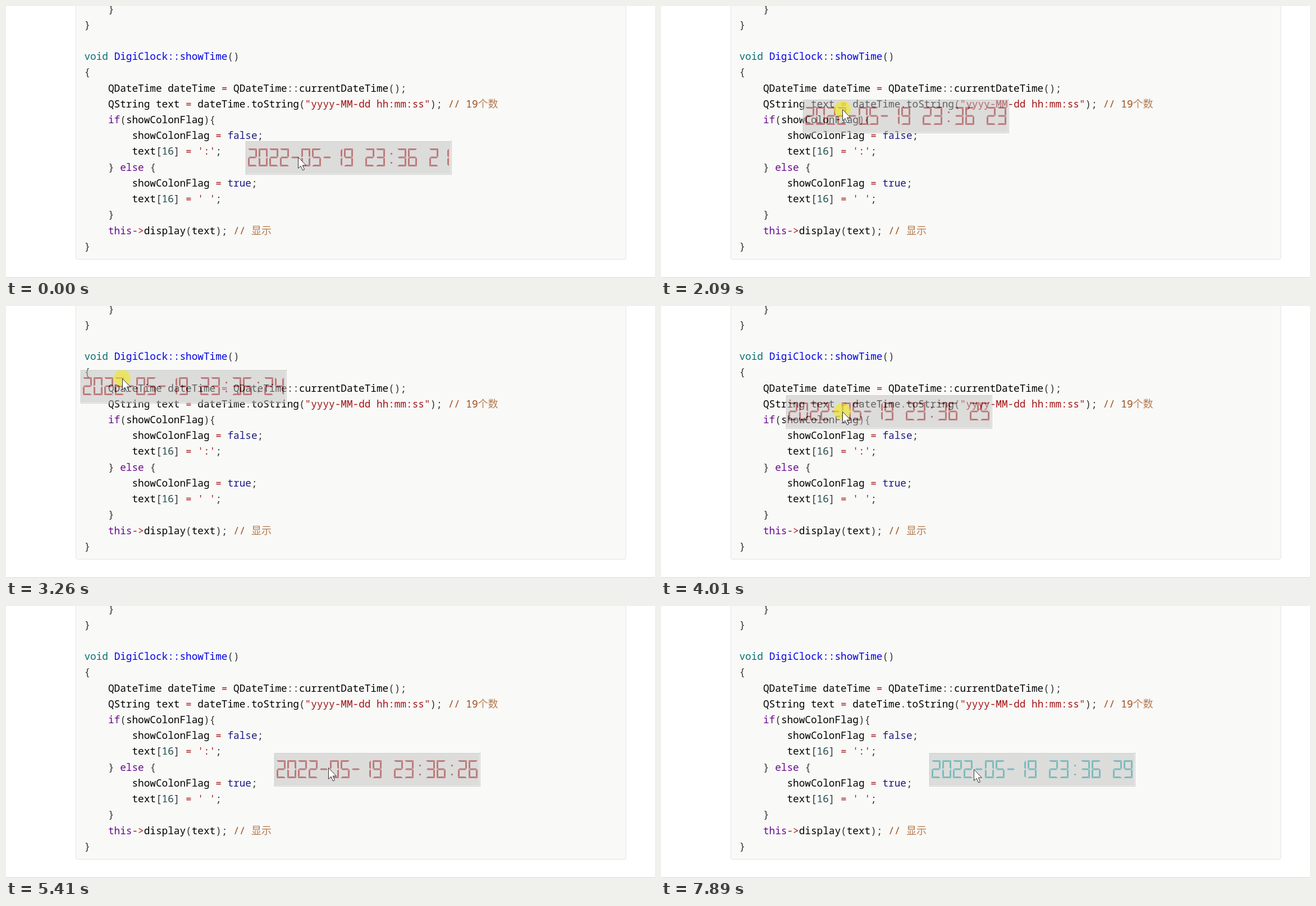
These frames come from a looping animation (1156x485 px, 8000 ms). An HTML page:

```html
<!DOCTYPE html>
<html lang="zh">
<head>
<meta charset="utf-8">
<title>DigiClock</title>
<style>
html, body { margin: 0; width: 100%; height: 100%; overflow: hidden; background: #fff; }
svg { display: block; width: 1156px; height: 485px; }
text { font: 17.72px "Noto Sans Mono", "DejaVu Sans Mono", monospace; white-space: pre; fill: #000; }
.p { fill: #333; }
.t { fill: #087070; }
.f { fill: #0000e6; }
.o { fill: #a61717; }
.s { fill: #a31515; }
.n { fill: #204a4a; }
.k { fill: #660a8a; }
.b { fill: #1a1a80; }
.c { fill: #9c4a18; }
.z { fill: #b57a4d; font: 300 18px "Noto Sans CJK SC", "Noto Sans CJK", sans-serif; }
</style>
</head>
<body>
<svg viewBox="0 0 1156 485">
  <rect x="124.5" y="-9.5" width="979.5" height="461" rx="3" fill="#f9f9f8" stroke="#e3e3e3"/>
  <path d="M0 484.5H1156" stroke="#d4d4d4"/>
  <g id="code">
    <text class="p">    }</text>
    <text class="p">}</text>
    <text></text>
    <text><tspan class="t">void</tspan> <tspan class="f">DigiClock::showTime</tspan><tspan class="p">()</tspan></text>
    <text class="p">{</text>
    <text>    QDateTime dateTime <tspan class="o">=</tspan> QDateTime<tspan class="p">::</tspan>currentDateTime<tspan class="p">();</tspan></text>
    <text>    QString text <tspan class="o">=</tspan> dateTime<tspan class="p">.</tspan>toString<tspan class="p">(</tspan><tspan class="s">"yyyy-MM-dd hh:mm:ss"</tspan><tspan class="p">);</tspan> <tspan class="c">// 19</tspan><tspan class="z">个数</tspan></text>
    <text>    <tspan class="k">if</tspan><tspan class="p">(</tspan>showColonFlag<tspan class="p">){</tspan></text>
    <text>        showColonFlag <tspan class="o">=</tspan> <tspan class="b">false</tspan><tspan class="p">;</tspan></text>
    <text>        text<tspan class="p">[</tspan><tspan class="n">16</tspan><tspan class="p">]</tspan> <tspan class="o">=</tspan> <tspan class="s">':'</tspan><tspan class="p">;</tspan></text>
    <text>    <tspan class="p">}</tspan> <tspan class="k">else</tspan> <tspan class="p">{</tspan></text>
    <text>        showColonFlag <tspan class="o">=</tspan> <tspan class="b">true</tspan><tspan class="p">;</tspan></text>
    <text>        text<tspan class="p">[</tspan><tspan class="n">16</tspan><tspan class="p">]</tspan> <tspan class="o">=</tspan> <tspan class="s">' '</tspan><tspan class="p">;</tspan></text>
    <text class="p">    }</text>
    <text>    <tspan class="k">this</tspan><tspan class="o">-&gt;</tspan>display<tspan class="p">(</tspan>text<tspan class="p">);</tspan> <tspan class="c">// </tspan><tspan class="z">显示</tspan></text>
    <text class="p">}</text>
  </g>
  <g id="panel" opacity=".5">
    <rect width="368" height="61" fill="#c0c0c0"/>
    <path d="M0 60.5V.5H368" fill="none" stroke="#fff"/>
    <path d="M1.5 59V1.5H367M1 60.5H367.5V0" fill="none" stroke="#a8a8a8"/>
    <path d="M2 59.5H366.5V2" fill="none" stroke="#e8e8e8"/>
    <path id="digits"/>
  </g>
  <circle id="press" r="15" fill="#f2e81e" fill-opacity=".62"/>
  <path id="cursor" d="M.5 .5V20.5L5 16.3L8.6 24L11.6 22.6L8.2 15.1H14.3Z" fill="#fff" stroke="#333" stroke-linejoin="round"/>
</svg>
<script>
const $ = id => document.getElementById(id);
const LOOP = 8000;

[...$('code').children].forEach((line, i) => {
  line.setAttribute('x', 139.5);
  line.setAttribute('y', 11.6 + i * 28.21);
});

// Bevelled bars in a cell of 16 x 32; sx and sy point inwards
const W = 16, H = 32, T = 3;
const bar = (y, sy) => x => `M${x} ${y}h${W}l${-T} ${T * sy}h${2 * T - W}z`;
const post = (dx, sx, y, sy) => x =>
  `M${x + dx} ${y}v${15 * sy}l${T * sx} ${-T / 2 * sy}v${-10.5 * sy}z`;
const dot = y => x => `M${x + 7} ${y}h${T}v${T}h${-T}z`;
const SEG = {
  a: bar(0, 1), d: bar(H, -1),
  f: post(0, 1, 0.5, 1), b: post(W, -1, 0.5, 1),
  e: post(0, 1, H - 0.5, -1), c: post(W, -1, H - 0.5, -1),
  g: x => `M${x + 1} ${W}l2 -1.5h10l2 1.5l-2 1.5h-10z`,
  u: dot(8), l: dot(24)
};
const GLYPH = {
  0: 'abcdef', 1: 'bc', 2: 'abged', 3: 'abgcd', 4: 'fgbc', 5: 'afgcd',
  6: 'afgedc', 7: 'abc', 8: 'abcdefg', 9: 'abcdfg', '-': 'g', ':': 'ul', ' ': ''
};
const lcd = text => [...text].map((ch, i) =>
  [...GLYPH[ch]].map(s => SEG[s](i * 19)).join('')).join('');
$('digits').setAttribute('transform', 'translate(5 14)');

// Waypoints of the dragged panel: time, x, y
const DRAG = [
  [1450, 426, 240], [1690, 404, 233], [2420, 128, 109], [2640, 100, 90],
  [3120, 150, 126], [3500, 100, 88], [4010, 222, 158], [4540, 436, 254],
  [4850, 477, 261]
];
const GREEN_FROM = 27;
const COLORS = ['#008000', '#000080', '#008080'];

const part = (t, a, b) => Math.min(1, Math.max(0, (t - a) / (b - a)));
const mix = (a, b, p) => a + (b - a) * p;

// Smooth curve through the waypoints, at rest at both ends
function slope(i, n) {
  const a = DRAG[i - 1], b = DRAG[i + 1];
  return a && b ? (b[n] - a[n]) / (b[0] - a[0]) : 0;
}
function panelAt(t) {
  const last = DRAG.length - 2;
  const next = DRAG.findIndex(k => k[0] > t);
  const i = next < 0 ? last : Math.max(0, next - 1);
  const a = DRAG[i], b = DRAG[i + 1], span = b[0] - a[0];
  const p = part(t, a[0], b[0]), q = 1 - p;
  return [1, 2].map(n =>
    mix(a[n], b[n], p * p * (3 - 2 * p)) +
    span * p * q * (q * slope(i, n) - p * slope(i + 1, n)));
}

// The pointer runs a little ahead of the panel, then wanders off and back
function cursorAt(t) {
  const [x, y] = panelAt(t + 50);
  const grip = part(t, 1450, 4850), away = part(t, 5200, 5800);
  const swing = Math.sin(Math.PI * away);
  return [
    x + mix(94, 80, grip) + 19 * swing,
    y + mix(29, 19, grip) + 11 * away + 4.5 * swing
  ];
}

const pressed = t => [[210, 560], [1030, 5070], [5950, 6700]].some(([a, b]) => t >= a && t < b);
const move = (el, pos) =>
  el.setAttribute('transform', `translate(${pos.map(Math.round).join(' ')})`);

function draw(t) {
  const sec = 21 + Math.floor((t + 400) / 1000);
  $('digits').setAttribute('d', lcd('2022-05-19 23:36' + (sec % 2 ? ' ' : ':') + sec));
  $('digits').setAttribute('fill', COLORS[sec - GREEN_FROM] || '#800000');
  const tip = cursorAt(t);
  move($('panel'), panelAt(t));
  move($('cursor'), tip);
  move($('press'), tip);
  $('press').style.display = pressed(t) ? '' : 'none';
}

const start = performance.now();
function tick() {
  draw((performance.now() - start) % LOOP);
  requestAnimationFrame(tick);
}
tick();
</script>
</body>
</html>
```
